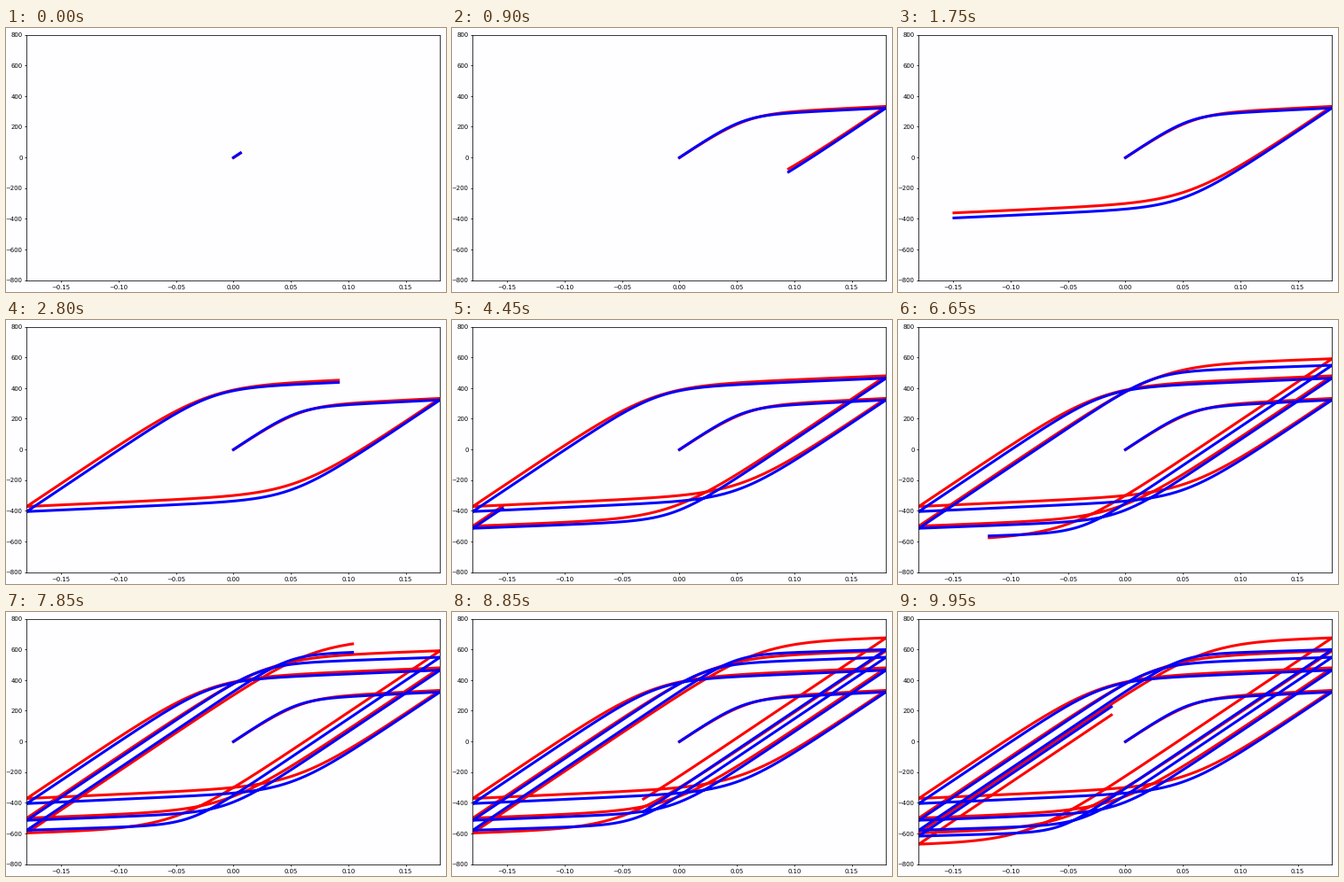
A matplotlib script for the animation above (10 s loop, 496 px wide and 298 px high).

```python
import numpy as np
import matplotlib.pyplot as plt
from matplotlib.animation import FuncAnimation

W, H, DPI = 496, 298, 50
LEFT, RIGHT, TOP, BOTTOM = 23.4, 489.4, 7.6, 284.6
FRAMES, INTERVAL = 200, 50
AMP = 0.18          # strain amplitude
STEP = 0.01438      # strain path travelled per frame
FIRST = 0.0063      # strain path already drawn at the start
STIFF = 5030        # elastic slope
HARD = 340          # slope after yield in the first full branch
FADE = 0.92         # change of that slope from branch to branch
PAPER = "#fefdff"


def stress_range(n, first, limit, gap, ratio):
    """Stress covered by branch n; it saturates as the loops go on."""
    return first if n < 0 else limit - gap * ratio ** n


def branch(d, span, rise, hard, width):
    """Elastic line that bends softly at yield and gains `rise` over `span`."""
    drop = STIFF - hard
    excess = (STIFF * span - rise) / drop
    knee = span - width * np.log(np.expm1(excess / width))
    return STIFF * d - drop * width * np.logaddexp(0, (d - knee) / width)


def stress(path, width, width_fade, **hardening):
    """Stress along the whole strain path, one branch after another."""
    y = np.zeros_like(path)
    begin, base, sign, n = 0, 0, 1, -1
    while begin < path[-1]:
        # The first loading is half a branch with a tighter knee.
        span = AMP if n < 0 else 2 * AMP
        knee_width = 0.65 * width if n < 0 else width * width_fade ** n
        rise = stress_range(n, **hardening)
        part = (path >= begin) & (path < begin + span)
        y[part] = base + sign * branch(path[part] - begin, span, rise,
                                       HARD * FADE ** n, knee_width)
        begin, base = begin + span, base + sign * rise
        sign, n = -sign, n + 1
    return y


path = np.arange(0, FIRST + FRAMES * STEP, STEP / 40)
strain = AMP - np.abs((path + AMP) % (4 * AMP) - 2 * AMP)
red = stress(path, 0.024, 1, first=333, limit=1836, gap=1131, ratio=0.87)
blue = stress(path, 0.02, FADE, first=323, limit=1345, gap=617, ratio=0.77)

plt.rcParams["text.hinting"] = "none"
fig = plt.figure(figsize=(W / DPI, H / DPI), dpi=DPI, facecolor=PAPER)
ax = fig.add_axes([LEFT / W, 1 - BOTTOM / H,
                   (RIGHT - LEFT) / W, (BOTTOM - TOP) / H], facecolor=PAPER)
ax.set_xlim(-AMP, AMP)
ax.set_ylim(-800, 800)
ax.tick_params(labelsize=9.9, width=1.1)
for spine in ax.spines.values():
    spine.set_linewidth(1.1)

red_line, = ax.plot([], [], color="#ff0000", lw=4.4)
blue_line, = ax.plot([], [], color="#0000ff", lw=4.4)


def draw(frame):
    n = np.searchsorted(path, FIRST + frame * STEP, side="right")
    red_line.set_data(strain[:n], red[:n])
    blue_line.set_data(strain[:n], blue[:n])
    return red_line, blue_line


anim = FuncAnimation(fig, draw, frames=FRAMES, interval=INTERVAL,
                     repeat=True, repeat_delay=0)
plt.show()
```
